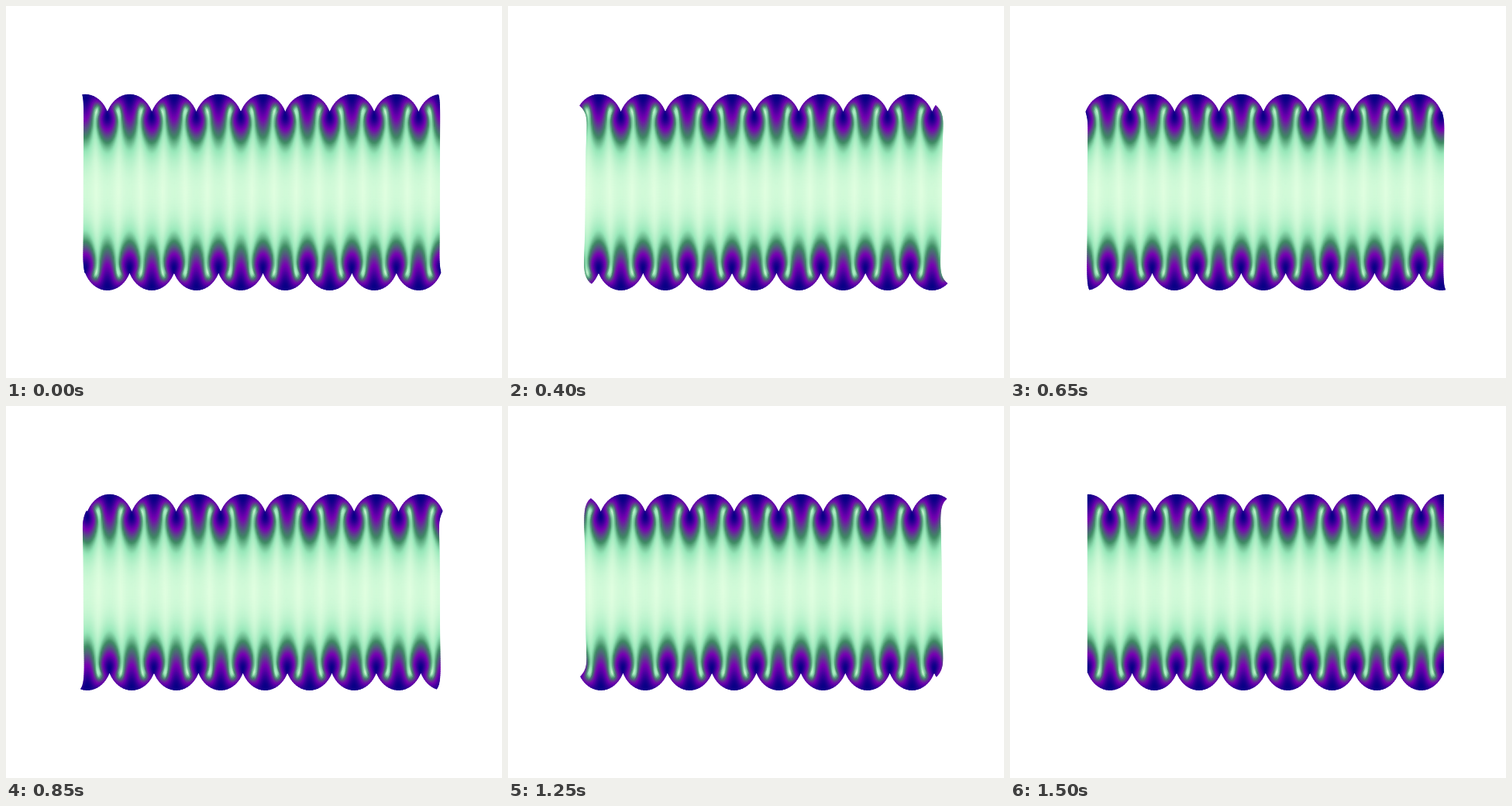
Recreate the animation shown at these times as a matplotlib script. Size 640x480 px, loop 1550 ms.

```python
import numpy as np
import matplotlib.pyplot as plt
from matplotlib.animation import FuncAnimation
from matplotlib.colors import LinearSegmentedColormap

W, H, DPI = 640, 480, 100
FRAMES, INTERVAL = 31, 50

# Plate at rest, in pixels: eight wavelengths long, four thick
LEFT, MIDDLE, LENGTH = 100.3, 240.4, 459
THICK = LENGTH / 2
K = 2 * np.pi * 8 / LENGTH
PEAK = 11.9

# Rayleigh wave decay rates for a Poisson ratio of 0.25
Q, S = 0.8475 * K, 0.3933 * K
SCALE = PEAK / 0.651

# Pale green at rest, through sea green and violet, to navy
cmap = LinearSegmentedColormap.from_list("wave", [
    (0, "#e1ffe1"), (0.14, "#98e8ba"), (0.27, "#3e8b63"),
    (0.58, "#7a00b4"), (1, "#080086")], N=512)

x, depth = np.meshgrid(np.linspace(LEFT, LEFT + LENGTH, 231),
                       np.linspace(0, THICK, 116))
y = MIDDLE - THICK / 2 + depth


def along(z):
    return SCALE * (np.exp(-Q * z) - 0.5773 * np.exp(-S * z))


def across(z):
    return SCALE * (1.4679 * np.exp(-S * z) - 0.8475 * np.exp(-Q * z))


# The two faces bend together: along-motion is opposite, across-motion equal
amp_x = along(depth) - along(THICK - depth)
amp_y = across(depth) + across(THICK - depth)

fig = plt.figure(figsize=(W / DPI, H / DPI), dpi=DPI, facecolor="white")
ax = fig.add_axes([0, 0, 1, 1])
ax.set_xlim(0, W)
ax.set_ylim(H, 0)
ax.axis("off")


def update(i):
    for mesh in list(ax.collections):
        mesh.remove()
    theta = K * (x - LEFT) - 2 * np.pi * (i + 1) / FRAMES
    ux = amp_x * np.sin(theta)
    uy = -amp_y * np.cos(theta)
    mesh = ax.pcolormesh(x + ux, y + uy, np.hypot(ux, uy), cmap=cmap,
                         vmin=0, vmax=PEAK, shading="gouraud")
    return [mesh]


anim = FuncAnimation(fig, update, frames=FRAMES, interval=INTERVAL,
                     init_func=lambda: [], repeat=True, repeat_delay=0)
plt.show()
```
